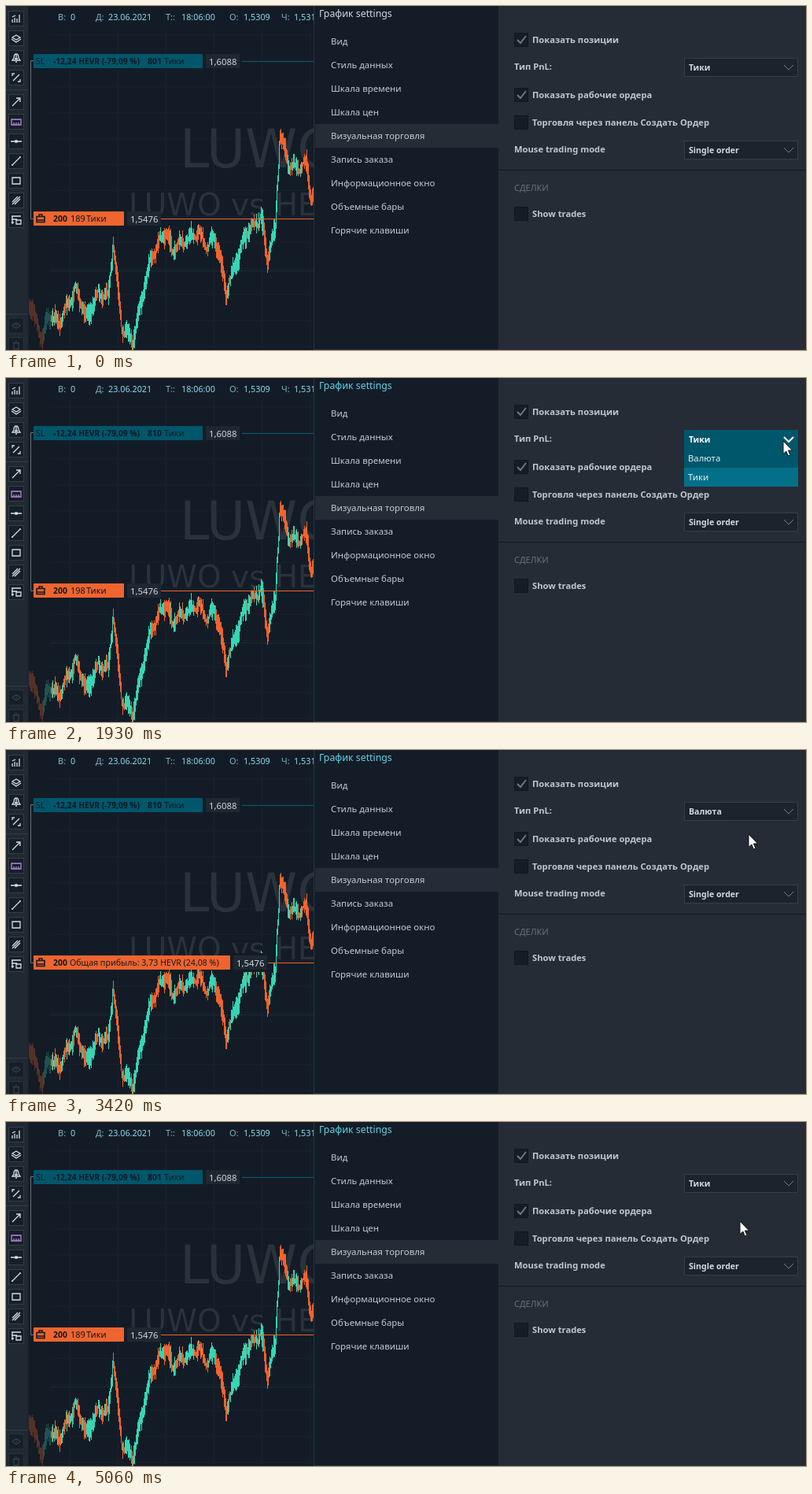
These frames come from a looping animation (1017 by 437 pixels, 5.45 s). An HTML page:

```html
<!DOCTYPE html>
<html lang="ru">
<head>
<meta charset="utf-8">
<title>График settings</title>
<style>
html, body { margin: 0; width: 100%; height: 100%; overflow: hidden; background: #131c26; }
svg { display: block; width: 1017px; height: 437px; font-family: "Noto Sans", "Open Sans", sans-serif; }
text { white-space: pre; }
.mark { font-family: "DejaVu Sans", sans-serif; fill: #2a323b; }
.crisp { shape-rendering: crispEdges; }
.off { display: none; }
</style>
</head>
<body>
<svg id="stage" viewBox="0 0 1017 437"></svg>
<script>
const LOOP = 5450;
const INK = '#d3d9df', DARK = '#0d1a22', TEAL = '#00566b', HOVER = '#046f89',
      UP = '#35d6b4', DOWN = '#f0642f', BACK = '#131c26', PANEL = '#252c36',
      FIELD = '#1b232d', EDGE = '#343d48';

const rect = (x, y, w, h, fill, extra = '') =>
  `<rect x="${x}" y="${y}" width="${w}" height="${h}" fill="${fill}" ${extra}/>`;
const line = (d, color, extra = '') =>
  `<path d="${d}" fill="none" stroke="${color}" ${extra}/>`;
const text = (x, y, s, { size = 12, fill = INK, weight = 400, id = '', cls = '' } = {}) =>
  `<text x="${x}" y="${y}" font-size="${size}" fill="${fill}" font-weight="${weight}" id="${id}" class="${cls}">${s}</text>`;
const group = (id, body) => `<g id="${id}">${body}</g>`;

// ---- price chart -------------------------------------------------------
// Turning points of the price; the ripple between them is generated.
const turns = `28,372 46,424 54,392 66,402 89,360 102,396 118,364 130,368 136,300 147,408
  161,425 184,320 202,286 211,310 243,286 255,306 266,294 280,364 306,286 324,268 332,320
  342,285 348,164 360,204 382,202 388,244 391,235`.split(/\s+/).map(p => p.split(',').map(Number));

function trend(x) {
  const i = Math.max(1, turns.findIndex(p => p[0] > x));
  const [[x0, y0], [x1, y1]] = [turns[i - 1], turns[i]];
  return y0 + (y1 - y0) * (x - x0) / (x1 - x0);
}

let seed = 7;
const random = () => (seed = (seed * 16807) % 2147483647) / 2147483647;

function candles() {
  const paths = { [UP]: '', [DOWN]: '' };
  let color = UP;
  for (let x = 28; x < 391; x++) {
    const slope = trend(x + 1) - trend(x);
    const mid = trend(x) + 5 * Math.sin(x / 2.1) + (random() - .5) * 7;
    const half = 3 + 9 * random() ** 1.5 + Math.min(6, Math.abs(slope));
    if (random() < .55) color = random() < .5 - slope / 10 ? UP : DOWN;
    paths[color] += `M${x + .5} ${Math.round(mid - half)}V${Math.round(mid + half)}`;
  }
  return Object.entries(paths).map(([c, d]) => line(d, c, 'class="crisp"')).join('');
}

function grid() {
  let d = '';
  for (let x = 81; x < 391; x += 61) d += `M${x + .5} 28V437`;
  for (let y = 36; y < 437; y += 33) d += `M57 ${y + .5}H391`;
  return line(d, '#18212b') + line('M57 336.5H391', '#182c36');
}

const chip = (x, y, s) =>
  rect(x, y - 9, 43, 18, '#1f2731', 'rx="1"') + text(x + 4, y + 4.5, s, { size: 11.3 });

function header() {
  const items = [[66, 'В:', 82, '0'], [114, 'Д:', 130, '23.06.2021'], [203, 'Т::', 223, '18:06:00'],
                 [284, 'О:', 302, '1,5309'], [350, 'Ч:', 366, '1,5313']];
  return items.map(([a, key, b, value]) =>
    text(a, 17.5, key, { size: 11, fill: '#7fb4c6' }) +
    text(b, 17.5, value, { size: 10.8, fill: '#86dcf2', weight: 500 })).join('');
}

function chart() {
  const note = { size: 11, fill: DARK };
  const bold = { ...note, weight: 600 };
  return grid() +
    text(221, 205, 'LUWO', { size: 67, cls: 'mark' }) +
    text(156, 266, 'LUWO vs HEVR', { size: 39, cls: 'mark' }) +
    candles() + rect(28, 28, 29, 409, BACK, 'opacity=".7"') + header() +
    line('M36 69.5H31.5V270.5H36', '#67727c') +
    line('M250 70.5H391', '#04596e') +
    rect(35, 61, 215, 18, TEAL, 'rx="1"') +
    text(38, 74, 'SL', { ...note, size: 10.5 }) +
    text(60, 74, '-12,24 HEVR (-79,09 %)', { ...bold, size: 10.2 }) +
    text(180, 74, '', { ...bold, size: 10.4, id: 'stop' }) +
    text(201, 74, 'Тики', note) +
    rect(250, 61, 50, 18, BACK) + chip(254, 70, '1,6088') +
    line('M150 270.5H391', DOWN) +
    group('ticksLabel', rect(150, 261, 47, 18, BACK) + chip(154, 270, '1,5476') +
      rect(35, 261, 115, 18, DOWN, 'rx="1"') +
      text(82, 274, '', { ...note, id: 'gain' }) + text(102, 274, 'Тики', note)) +
    group('moneyLabel', rect(35, 261, 250, 18, DOWN, 'rx="1"') +
      text(81, 274, '', { ...note, size: 10.6, id: 'profit' })) +
    group('moneyChip', rect(285, 258, 48, 24, BACK) + chip(289, 270, '1,5476')) +
    line('M39 267.5H49V274.5H39ZM42 267V265H46V267M39 272H49', DARK, 'stroke-width="1.5"') +
    text(60, 274, '200', { ...bold, size: 10.4 });
}

// ---- tool strip --------------------------------------------------------
const iconSets = [
  { top: 16, color: '#d8dee4', icons: ['M-5 5V1M-2 5V-1M1 5V0M4 5V-5M-5 -2L-1 -4',
    'M0 -4L5 -1L0 2L-5 -1ZM-6 1L0 5L6 1', 'M-5 3H5L3 0Q3 -5 0 -5Q-3 -5 -3 0ZM-1 5H1M-2 1H2M0 -4V2',
    'M-5 -2V-5H-2M5 2V5H2M-4 4L4 -4'] },
  { top: 122, color: '#d8dee4', icons: ['M-5 5L5 -5M0 -5H5V0', 'M-6 -3H6V4H-6ZM-3 4V1M0 4V1M3 4V1',
    'M-7 0H7M-1 -1H1V1H-1Z', 'M-5 5L5 -5M-6 5H-4M4 -5H6', 'M-5 -4H5V4H-5Z',
    'M-5 2L2 -5M-2 5L5 -2M-5 5L5 -5', 'M-6 -5H6M-6 -1H1M-6 3H-3M0 0H6V5H0ZM-5 -5V5'] },
  { top: 406, color: '#343d48', icons: ['M-5 0Q0 -6 5 0Q0 6 -5 0ZM-1 0H1', 'M-4 -3H4M-3 -3V5H3V-3M-1 -5H1'] }
];

const tools = () => rect(0, 0, 28, 437, '#202832') +
  iconSets.map(({ top, color, icons }) => icons.map((d, i) => {
    const y = top + 25 * i;
    return rect(3.5, y - 9.5, 19, 19, color === INK ? FIELD : '#161e28', `stroke="${color === '#343d48' ? '#262e39' : EDGE}"`) +
      line(d, d.includes('M-6 -3') ? '#b48ad8' : color, `transform="translate(13 ${y})" stroke-width="1.3"`);
  }).join('')).join('') +
  line('M0 106.5H28M0 391.5H28', EDGE) + line('M28.5 0V437', '#18212b');

// ---- settings window ---------------------------------------------------
function menu() {
  const items = ['Вид', 'Стиль данных', 'Шкала времени', 'Шкала цен', 'Визуальная торговля',
    'Запись заказа', 'Информационное окно', 'Объемные бары', 'Горячие клавиши'];
  return rect(391, 0, 235, 437, '#141d27') + rect(393, 150, 233, 30, PANEL) +
    text(398, 14, 'График settings', { id: 'title', size: 12.3 }) +
    items.map((s, i) => text(413, 49 + i * 30, s, { size: 11.4, fill: '#c3cbd3' })).join('');
}

const label = (x, y, s) => text(x, y, s, { size: 11.2, weight: 600, fill: '#c0c7ce' });
const check = (y, s, on) => rect(646.5, y - 8.5, 17, 17, '#151d27', 'stroke="#10171f"') +
  (on ? line(`M650 ${y}L654 ${y + 4}L661 ${y - 5}`, '#6f7983', 'stroke-width="2"') : '') +
  label(669, y + 4, s);
const select = (y, id, s) =>
  rect(862.5, y - 11.5, 144, 23, FIELD, `stroke="${EDGE}" id="${id}Box"`) +
  text(868, y + 4, s, { size: 10.6, weight: 600, id: id + 'Text' }) +
  line(`M989 ${y - 3}L995 ${y + 3}L1001 ${y - 3}`, '#77818b', `id="${id}Arrow"`);

function options() {
  const option = { size: 11.3, fill: '#e3f2f6' };
  return rect(626, 0, 391, 437, PANEL) +
    check(43, 'Показать позиции', true) + label(646, 81, 'Тип PnL:') + select(78, 'kind', 'Тики') +
    check(113, 'Показать рабочие ордера', true) +
    check(148, 'Торговля через панель Создать Ордер', false) +
    label(646, 186, 'Mouse trading mode') + select(183, 'mode', 'Single order') +
    line('M626 208.5H1017', '#10171f') +
    text(646, 235, 'СДЕЛКИ', { size: 11, fill: '#66707a' }) +
    check(264, 'Show trades', false) +
    group('list', rect(862, 90, 145, 48, TEAL) + rect(862, 90, 145, 24, HOVER, 'id="hover"') +
      text(867, 106, 'Валюта', option) + text(867, 130, 'Тики', option)) +
    line('M391.5 0V437M391 436.5H1017', '', 'id="frame"');
}

const pointer = group('pointer',
  '<path d="M0 0V16.5L3.8 13L6.4 19L9 17.8L6.4 12H11.6Z" fill="#fff" stroke="#111"/>');

const stage = document.getElementById('stage');
stage.innerHTML = rect(0, 0, 1017, 437, BACK) + chart() + tools() + menu() + options() + pointer;
const el = Object.fromEntries([...stage.querySelectorAll('[id]')].map(n => [n.id, n]));

// ---- timeline ----------------------------------------------------------
const moves = [
  { from: 470, to: 970, x: 1006, y: 115 },
  { from: 970, to: 1560, x: 988, y: 80 },
  { from: 2070, to: 2590, x: 944, y: 107 },
  { from: 3420, to: 3930, x: 942, y: 85 },
  { from: 4160, to: 4610, x: 933, y: 126 }
];

const ramp = (t, from, to) => Math.min(1, Math.max(0, (t - from) / (to - from)));
const between = (t, a, b) => t >= a && t < b;
const show = (node, on) => node.classList.toggle('off', !on);
const setAttrs = (node, attrs) => Object.entries(attrs).forEach(([k, v]) => node.setAttribute(k, v));

function pointerAt(t) {
  let x = 1010, y = 366;
  for (const m of moves) {
    const k = ramp(t, m.from, m.to);
    x += (m.x - x) * k;
    y += (m.y - y) * k;
  }
  return { x: Math.round(x), y: Math.round(y) };
}

const stopTicks = t => 801 + Math.floor(9 * ramp(t, 220, 1630))
  - Math.round(7 * ramp(t, 3420, 3930)) - Math.floor(2 * ramp(t, 4160, 5060));

function draw(t) {
  const { x, y } = pointerAt(t);
  show(el.pointer, t >= 470);
  el.pointer.setAttribute('transform', `translate(${x} ${y})`);

  const stop = stopTicks(t);
  el.stop.textContent = stop;
  el.gain.textContent = stop - 612;
  el.profit.textContent = 'Общая прибыль: 3,73 HEVR (24,08 %)';

  const active = between(t, 1770, 2650) || between(t, 3930, 4750);
  const open = between(t, 1850, 2650) || between(t, 4010, 4750);
  show(el.list, open);
  el.hover.setAttribute('y', t < 2220 || y >= 114 ? 114 : 90);
  el.kindText.textContent = between(t, 2650, 4750) ? 'Валюта' : 'Тики';
  el.kindText.setAttribute('fill', active ? '#fff' : INK);
  setAttrs(el.kindBox, { fill: active ? TEAL : FIELD, stroke: active ? TEAL : EDGE });
  setAttrs(el.kindArrow, { stroke: active ? '#fff' : '#77818b', 'stroke-width': active ? 2 : 1 });

  const money = between(t, 2730, 4830);
  show(el.ticksLabel, !money);
  show(el.moneyLabel, money);
  show(el.moneyChip, between(t, 2890, 4830));

  const focused = t >= 1770;
  el.title.setAttribute('fill', focused ? '#62d3ea' : INK);
  el.frame.setAttribute('stroke', focused ? '#1f3a47' : '#2a333d');
}

const start = performance.now();
function tick() {
  draw((performance.now() - start) % LOOP);
  requestAnimationFrame(tick);
}
tick();
</script>
</body>
</html>
```
